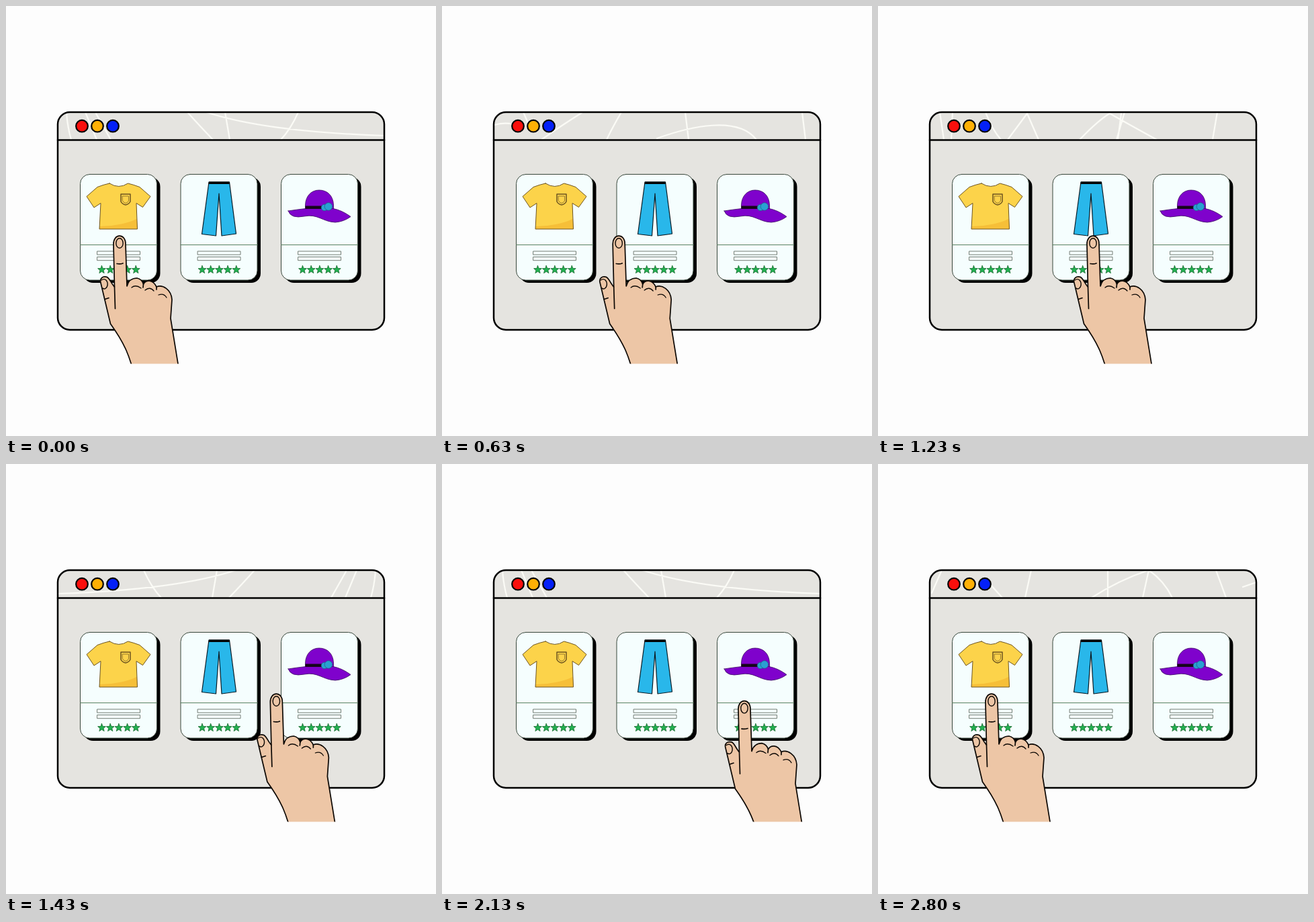
Write an HTML page that moves like this. It is 640 px wide and 640 px high and loops after 2.83 s.

```html
<!DOCTYPE html>
<html lang="en">
<head>
<meta charset="utf-8">
<title>Shop window</title>
<style>
  html, body { margin: 0; width: 100%; height: 100%; overflow: hidden; background: #fdfdfd; }
  svg { display: block; width: 100%; height: 100%; }
</style>
</head>
<body>
<svg viewBox="0 0 640 640" stroke-linejoin="round" stroke-linecap="round">
  <defs>
    <clipPath id="barClip"><path d="M77 199V176a18 18 0 0 1 18-18H545a18 18 0 0 1 18 18V199Z"/></clipPath>
    <clipPath id="handClip"><rect width="640" height="532.5"/></clipPath>
    <path id="shirt" d="M154 264Q145 266 136 269.500L120 283.500L131 300L141 293.500L139 332H195.500L194 293.500L203.500 299.500L215 283.500L199 269.500Q190 266 181.500 264Q168 273 154 264Z"/>
    <clipPath id="shirtClip"><use href="#shirt"/></clipPath>
    <path id="star"/>
    <g id="card">
      <rect x="115.5" y="255" width="114" height="157" rx="14"/>
      <rect x="110.5" y="250.5" width="114" height="157.5" rx="14" fill="#f5fefe" stroke="#39463a"/>
      <g fill="#f5fefe" stroke="#747d74">
        <path d="M110.5 355.5H224.5" stroke="#5b8060" stroke-width="1.2"/>
        <rect x="136" y="365" width="63.5" height="5.2"/>
        <rect x="136" y="373.5" width="63.5" height="5.2"/>
      </g>
      <g id="stars" fill="#20b150" stroke="#17672c" stroke-width=".8"></g>
    </g>
  </defs>

  <rect x="77" y="158" width="486" height="324" rx="18" fill="#e5e4e0"/>
  <g clip-path="url(#barClip)">
    <path id="scratches" fill="none" stroke="#fbfbf6" stroke-width="2.2"/>
  </g>
  <g fill="none" stroke="#000" stroke-width="2.5">
    <rect x="77" y="158" width="486" height="324" rx="18"/>
    <path d="M77 199.5H563"/>
  </g>
  <g stroke="#000" stroke-width="2.2">
    <circle cx="113" cy="178.7" r="8.8" fill="#fa0f0c"/>
    <circle cx="136" cy="178.7" r="8.8" fill="#ffb005"/>
    <circle cx="159" cy="178.7" r="8.8" fill="#0420f8"/>
  </g>

  <g class="item">
    <use href="#card"/>
    <use href="#shirt" fill="#fcd34a"/>
    <path clip-path="url(#shirtClip)" d="M139 328Q176 327 196 316V333H139Z" fill="#f6bf38"/>
    <g fill="none" stroke="#6e5520">
      <use href="#shirt"/>
      <path d="M171 280H185V291Q183 295 178 296Q173 295 171 291Z" stroke-width="1.5"/>
      <path d="M173.5 283H182.5V290Q181 293 178 293.5Q175 293 173.5 290Z" stroke-width=".7"/>
    </g>
  </g>

  <g class="item">
    <use href="#card" x="149.5"/>
    <path d="M302 262H332.5L342.5 339L321 342L317 279L312.5 342L291.5 339.5Z" fill="#29b7ea" stroke="#0a1b24" stroke-width="1.2"/>
    <path d="M302 261.5H332.5L333 265H301.5Z"/>
  </g>

  <g class="item">
    <use href="#card" x="299"/>
    <g fill="#7f02cc" stroke="#3c1060" stroke-width=".8">
      <path d="M445.5 303V296C446 282 455 274 466 274C478 274 487 282 487.5 296V303Z"/>
      <path d="M420 305Q432 303 446 301.5H487Q500 304 513 313.5Q503 321 490 322C471 321 464 309 444 313Q424 317 420 305Z"/>
    </g>
    <path d="M445.5 297.5H472V302H445.5Z" fill="#16051a"/>
    <g fill="#2aa0d2" stroke="#1b5f80" stroke-width=".7">
      <circle cx="474" cy="300" r="4.8"/>
      <circle cx="480" cy="298.5" r="5.8"/>
    </g>
  </g>

  <g clip-path="url(#handClip)">
    <g id="hand" fill="none" stroke="#0c0703" stroke-width="1.7">
      <path fill="#edc6a6" d="M194 560C184 520 177 503 155.5 473L141 412C139 405 144 402 150 403.3C155 406 157 414 161.5 418L160 355C159.5 338 178 338 178 354L180 417C182 409 188 405 195 405C200 406 203 409 204.5 414C208 408 218 406 224 418C233 414 246 422 247 437L245 465L260.5 560Z"/>
      <path d="M161.5 418L162.5 450.5M165 383.5Q170 384.5 174 383M147 436.5L153 434.5M204.5 414L204 419M224 418L224 422"/>
      <path stroke-width="1.3" d="M187 419Q193 414 201 420M207 423Q214 417 220 424M227 430Q235 427 239 434"/>
      <ellipse cx="169" cy="353" rx="5.2" ry="7.3" stroke-width="1.4"/>
      <path stroke-width="1.4" d="M142 408C148 404 152 410 151 416C150 421 146 422 144 420"/>
    </g>
  </g>
</svg>
<script>
  const LOOP = 2830, FRAMES = 85;
  const $ = id => document.getElementById(id);
  const hand = $('hand'), scratches = $('scratches');
  const items = [...document.querySelectorAll('.item')];
  const centers = [167.5, 317, 466.5];
  const TIP = { x: 169, y: 342 }, MIDDLE = 320, LAST = 465;

  const starPoints = Array.from({ length: 10 }, (_, i) => {
    const r = i % 2 ? 2.7 : 6.2, a = i * Math.PI / 5;
    return `${(r * Math.sin(a)).toFixed(2)} ${(-r * Math.cos(a)).toFixed(2)}`;
  });
  $('star').setAttribute('d', `M${starPoints.join('L')}Z`);
  $('stars').innerHTML = [0, 1, 2, 3, 4]
    .map(i => `<use href="#star" x="${142.5 + i * 12.7}" y="392.6"/>`).join('');

  const wide = 'M90 160Q92 182 97 199M118 158L135 199M134 160L156 199M270 158Q286 176 308 199M298 158Q385 187 563 193M326 158L333 199M435 158Q424 183 409 199';
  const peaks = 'M92 158L98 199M111 158L109 199M160 158Q170 184 183 199M193 199L222 160L239 199M300 199Q329 169 345 160Q373 176 415 199M367 158L355 199M362 160L357 199M505 158L498 199';
  const arch = 'M78 177Q94 173 105 176M121 158L128 174M148 199Q179 177 208 159M267 158Q254 180 245 199M320 197C370 179 440 163 468 199M362 158L367 199M536 158L541 199';
  const cross = 'M80 192L94 160M166 178L185 199M228 158L219 199M318 199Q358 173 403 158M342 158V199M403 158L394 199M403 158Q426 174 438 199M503 158L518 199M543 183L563 176';
  const textures = [[wide], [peaks], [wide, 1], [peaks, 1], [arch], [cross], [arch, 1], [cross, 1]];

  const ease = (frame, from, to) => {
    const w = Math.min(1, Math.max(0, (frame - from) / (to - from)));
    return w * w * (3 - 2 * w);
  };
  const mix = (a, b, u) => a + (b - a) * u;
  const pressScale = (frame, start) =>
    1 - 0.085 * (ease(frame, start, start + 6) - ease(frame, start + 6, start + 12));

  // Two straight hops to the right, then one sagging curve back.
  function tipAt(frame) {
    if (frame < 60) {
      const x = mix(TIP.x, MIDDLE, ease(frame, 12, 24));
      return { x: mix(x, LAST, ease(frame, 37, 48)), y: TIP.y };
    }
    const u = ease(frame, 60, 84), v = 1 - u;
    const along = 0.6 * u * v * v + 2.4 * u * u * v + u * u * u;
    return { x: mix(LAST, TIP.x, along), y: TIP.y + 154 * u * v };
  }

  function draw(time) {
    const frame = Math.min(FRAMES - 1, Math.floor(time % LOOP / LOOP * FRAMES + 0.2));
    const [path, mirrored] = textures[Math.floor(frame / 4) % textures.length];
    scratches.setAttribute('d', path);
    scratches.setAttribute('transform', mirrored ? 'translate(640) scale(-1 1)' : '');

    let handScale = 1;
    items.forEach((item, i) => {
      const s = pressScale(frame, i * 24), x = centers[i], y = 329.5;
      item.setAttribute('transform', `translate(${x} ${y}) scale(${s}) translate(${-x} ${-y})`);
      handScale *= s;
    });
    const { x, y } = tipAt(frame);
    hand.setAttribute('transform',
      `translate(${x} ${y}) scale(${handScale}) translate(${-TIP.x} ${-TIP.y})`);
  }

  const start = performance.now();
  function tick() {
    draw(performance.now() - start);
    requestAnimationFrame(tick);
  }
  tick();
</script>
</body>
</html>
```
